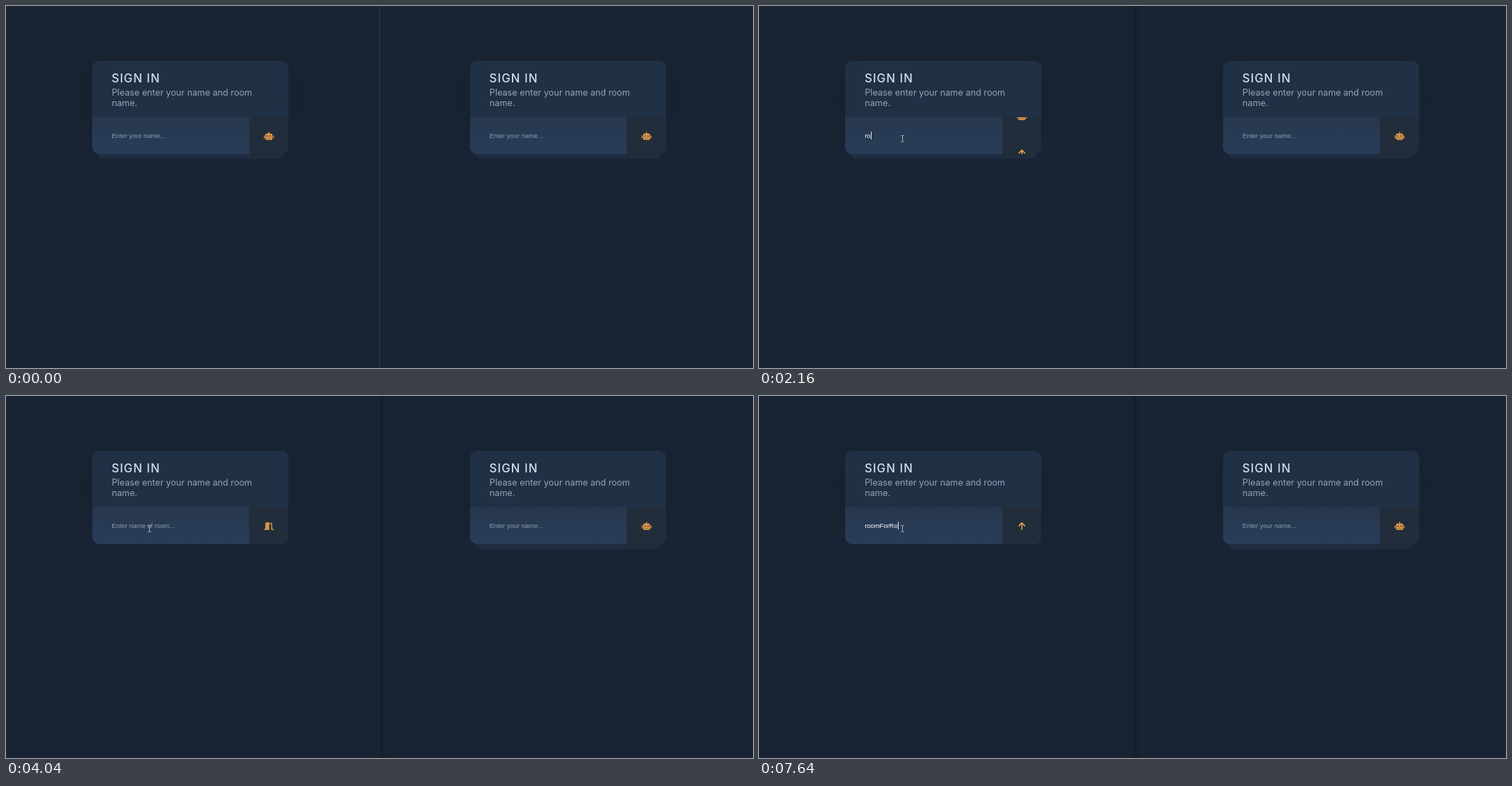
Animation, 1075 px wide and 521 px high, one loop 8000 ms. Source, as an HTML page with a canvas:

```html
<!DOCTYPE html>
<html lang="en">
<head>
<meta charset="utf-8">
<title>Sign in</title>
<style>
  html, body { margin: 0; width: 100%; height: 100%; overflow: hidden; background: #182433; }
  canvas { display: block; }
</style>
</head>
<body>
<canvas id="stage" width="1075" height="521"></canvas>
<script>
const ctx = document.getElementById('stage').getContext('2d');
const LOOP = 8000, CARD = { x: 124, y: 79, w: 282.5, fieldY: 160, fieldH: 53.2 };
const ORANGE = '#df9848', BUTTON = '#222d3b';
const UNFOLD_AT = 3788, WINDOW_FOCUS_AT = 1190;

const nameField = {
  hint: 'Enter your name...', text: 'robot1', icon: robot, focus: 1225,
  keys: [2068, 2155, 2340, 2555, 2715, 3355]
};
const roomField = {
  hint: 'Enter name of room...', text: 'roomForRo', icon: door, focus: 5250,
  keys: [5908, 6035, 6200, 6435, 6715, 6795, 7035, 7475, 7635]
};

// The CSS "ease" curve, cubic-bezier(.25, .1, .25, 1)
function ease(x) {
  if (x <= 0) return 0;
  if (x >= 1) return 1;
  const bez = (s, a, b) => 3 * s * (1 - s) ** 2 * a + 3 * s * s * (1 - s) * b + s ** 3;
  let lo = 0, hi = 1;
  for (let i = 0; i < 20; i++) {
    const mid = (lo + hi) / 2;
    if (bez(mid, .25, .25) < x) lo = mid; else hi = mid;
  }
  return bez(lo, .1, 1);
}
const transition = (t, start) => ease((t - start) / 300);
const mix = (a, b, p) => a + (b - a) * p;

function rect(x, y, w, h, fill) {
  ctx.fillStyle = fill;
  ctx.fillRect(x, y, w, h);
}
function rounded(x, y, w, h, radii) {
  ctx.beginPath();
  ctx.roundRect(x, y, w, h, radii);
}
function label(text, x, y, font, fill, spacing = '0px') {
  ctx.font = font;
  ctx.letterSpacing = spacing;
  ctx.fillStyle = fill;
  ctx.fillText(text, x, y);
}
function polygon(points) {
  ctx.beginPath();
  points.forEach(([x, y]) => ctx.lineTo(x, y));
  ctx.closePath();
  ctx.fill();
}
function dot(x, y, r) {
  ctx.beginPath();
  ctx.arc(x, y, r, 0, 7);
  ctx.fill();
}

// Icons live in a 640 x 512 box centred on cx, cy
function icon(cx, cy, draw) {
  ctx.save();
  ctx.translate(cx, cy);
  ctx.scale(.0221, .0221);
  ctx.translate(-320, -256);
  ctx.fillStyle = ctx.strokeStyle = ORANGE;
  draw();
  ctx.restore();
}
function robot() {
  rounded(96, 96, 448, 416, 72);
  ctx.fill();
  for (const [x, y, w, h] of [[288, 0, 64, 110], [0, 224, 64, 192], [576, 224, 64, 192]]) {
    rounded(x, y, w, h, 24);
    ctx.fill();
  }
  ctx.fillStyle = BUTTON;
  dot(224, 264, 40);
  dot(416, 264, 40);
  for (const x of [192, 288, 384]) ctx.fillRect(x, 384, 64, 32);
}
function door() {
  polygon([[96, 55], [130, 40], [352, 0], [352, 512], [0, 512], [0, 448], [96, 448]]);
  polygon([[384, 64], [544, 64], [544, 448], [640, 448], [640, 512], [480, 512], [480, 128], [384, 128]]);
  ctx.fillStyle = BUTTON;
  dot(288, 256, 30);
}
function arrowUp() {
  ctx.lineWidth = 84;
  ctx.lineCap = ctx.lineJoin = 'round';
  ctx.beginPath();
  ctx.moveTo(320, 468);
  ctx.lineTo(320, 60);
  ctx.moveTo(134, 242);
  ctx.lineTo(320, 56);
  ctx.lineTo(506, 242);
  ctx.stroke();
}

function fieldText(field, t, x, y) {
  const typed = field.text.slice(0, field.keys.filter(k => k <= t).length);
  const font = '9.4px "Liberation Sans", Arial, sans-serif';
  label(typed || field.hint, x, y, font, typed ? '#fff' : '#8d9cad');
  const lastInput = [field.focus, ...field.keys].filter(k => k <= t).pop();
  if (lastInput !== undefined && (t - lastInput) % 1060 < 530) {
    rect(Math.round(x + (typed ? ctx.measureText(typed).width : 0)), y - 9, 1, 11, '#e8edf2');
  }
}

// One input row: text on 80 % of the width, icon button on the rest
function row(field, t, x, y, w, folded) {
  const h = CARD.fieldH, split = x + w * .8, mid = y + h / 2 + .4;
  ctx.save();
  rounded(x, y, w, h, [0, 0, 10, 10]);
  ctx.clip();
  if (folded) {
    rect(x, y, w, h, '#1f2d41');
    rect(split, y, w * .2, h, '#202c3b');
  } else {
    const shade = ctx.createLinearGradient(0, y, 0, y + h);
    shade.addColorStop(0, '#27374f');
    shade.addColorStop(1, '#293d58');
    rect(x, y, w * .8, h, shade);
    rect(split, y, w * .2, h, BUTTON);
    fieldText(field, t, x + 28.2, y + 30);
    const slide = h * transition(t, field.keys[0]), cx = split + w * .1;
    icon(cx, mid - slide, field.icon);
    icon(cx, mid - slide + h, arrowUp);
  }
  ctx.restore();
}

function card(dx, t) {
  const { x, y, w, fieldY } = CARD;
  ctx.save();
  ctx.translate(dx, 0);

  ctx.save();
  ctx.shadowColor = 'rgba(0,0,0,.14)';
  ctx.shadowBlur = 55;
  ctx.shadowOffsetY = 10;
  ctx.fillStyle = '#203045';
  rounded(x, y, w, fieldY - y, [10, 10, 0, 0]);
  ctx.fill();
  ctx.restore();

  const open = transition(t, UNFOLD_AT), inset = 7 * (1 - open);
  ctx.save();
  ctx.beginPath();
  ctx.rect(x - 10, fieldY, w + 20, 80);
  ctx.clip();
  row(roomField, t, x + inset, fieldY + inset, w - 2 * inset, t < UNFOLD_AT);
  if (open < 1) row(nameField, t, x, fieldY - CARD.fieldH * open, w, false);
  ctx.restore();

  label('SIGN IN', 152, 109.5, '500 16.8px Inter, sans-serif', '#d3dfeb', '1.1px');
  const body = '12.7px Inter, sans-serif';
  label('Please enter your name and room', 152.2, 129, body, '#94a5b8');
  label('name.', 152.2, 143.7, body, '#94a5b8');
  ctx.restore();
}

function divider(t) {
  if (t < WINDOW_FOCUS_AT) return rect(537, 0, 1, 521, '#2b394a');
  const shade = ctx.createLinearGradient(540, 0, 549, 0);
  shade.addColorStop(0, 'rgba(0,0,0,.14)');
  shade.addColorStop(1, 'rgba(0,0,0,0)');
  rect(540, 0, 9, 521, shade);
  rect(539, 0, 1, 521, '#101a26');
}

// Pointer stops: time, x, y
const stops = [[400, 929, 494], [960, 196, 216], [1200, 204, 190], [1280, 206, 190.5]];
function pointer(t) {
  if (t < stops[0][0]) return;
  let [, x, y] = stops[stops.length - 1];
  for (let i = 1; i < stops.length; i++) {
    const a = stops[i - 1], b = stops[i];
    if (t < b[0]) {
      const u = (t - a[0]) / (b[0] - a[0]), p = u * u * (3 - 2 * u);
      x = mix(a[1], b[1], p);
      y = mix(a[2], b[2], p);
      break;
    }
  }
  const overInput = x > 124 && x < 350 && y > 160 && y < 220;
  if (overInput) {
    const left = Math.round(x), top = Math.round(y) - 5;
    rect(left, top + 1, 1, 8, '#b4b6b3');
    for (const edge of [top, top + 9]) {
      rect(left - 2, edge, 2, 1, '#b4b6b3');
      rect(left + 1, edge, 2, 1, '#b4b6b3');
    }
  } else {
    ctx.save();
    ctx.translate(x, y);
    ctx.fillStyle = '#fff';
    polygon([[0, 0], [0, 10], [2.3, 8], [4, 11.4], [5.4, 10.7], [3.8, 7.4], [7, 7.2]]);
    ctx.strokeStyle = '#111';
    ctx.lineWidth = .6;
    ctx.stroke();
    ctx.restore();
  }
}

function frame() {
  const t = performance.now() % LOOP;
  rect(0, 0, 1075, 521, '#182433');
  card(0, t);
  card(543.6, 0);
  divider(t);
  pointer(t);
  requestAnimationFrame(frame);
}
frame();
</script>
</body>
</html>
```
